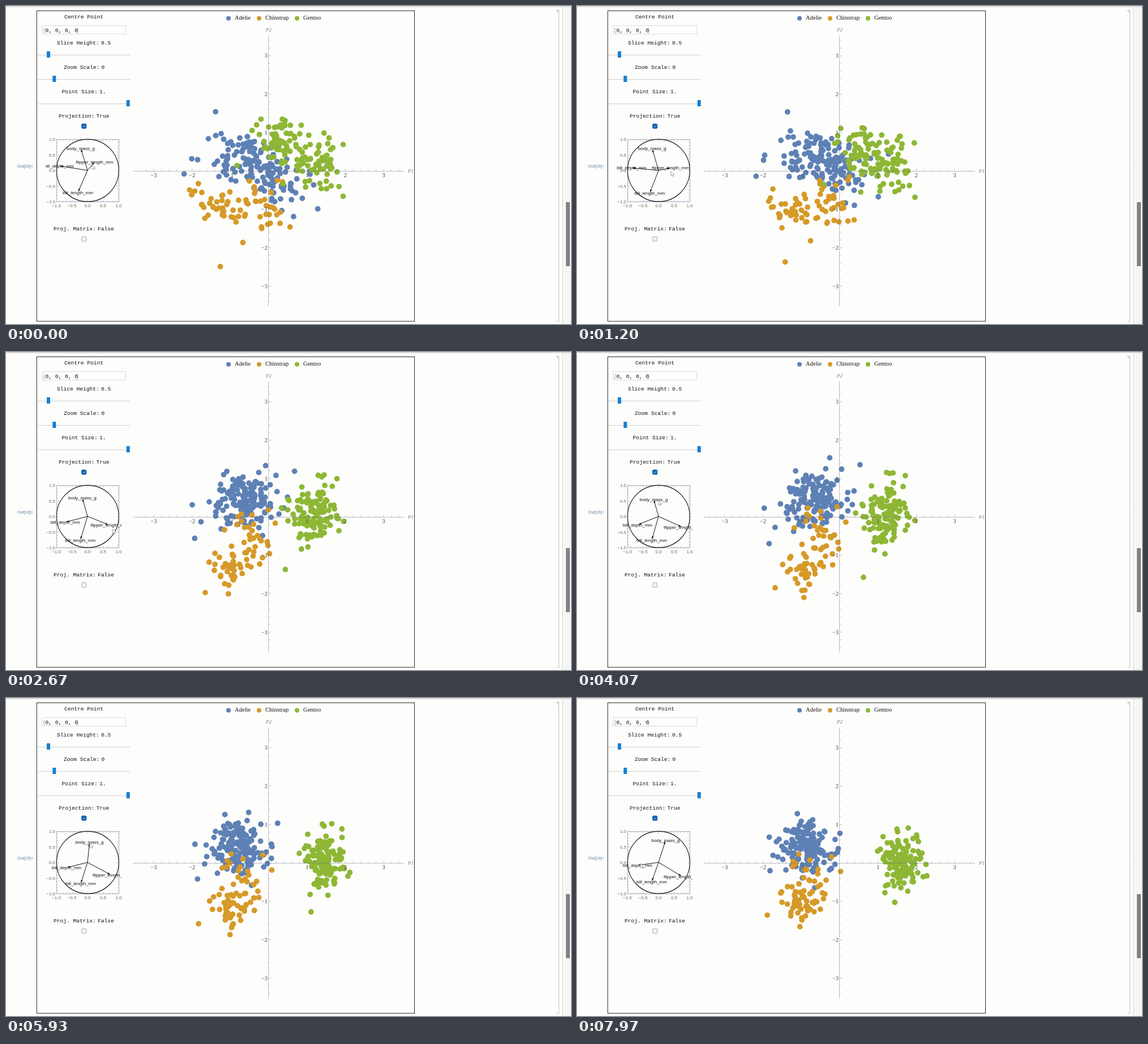
An HTML page with a canvas that plays this animation: 998 px wide and 561 px high, repeating every 8 s.

```html
<!DOCTYPE html>
<html lang="en">
<head>
<meta charset="utf-8">
<title>Projection tour</title>
<style>
html, body { margin: 0; width: 100%; height: 100%; overflow: hidden; background: #fdfdfc; }
canvas { display: block; width: 998px; height: 561px; }
</style>
</head>
<body>
<canvas id="stage"></canvas>
<script>
const W = 998, H = 561, LOOP = 8000;
const canvas = document.getElementById('stage');
const ctx = canvas.getContext('2d');
const dpr = window.devicePixelRatio || 1;
canvas.width = W * dpr;
canvas.height = H * dpr;
ctx.scale(dpr, dpr);

const MONO = '9.6px "Liberation Mono", "DejaVu Sans Mono", monospace';
const SANS = '"Liberation Sans", Arial, sans-serif';
const SERIF = '"Liberation Serif", "Times New Roman", serif';
const VARS = ['body_mass_g', 'flipper_length_mm', 'bill_depth_mm', 'bill_length_mm'];

// Label positions (x, y per variable) at the turning points of the two drags
const POSES = [
  [132, 251, 156.5, 275, 93.5, 282, 127, 329],
  [133.5, 252, 173, 296, 99, 289, 129.5, 332],
  [135.5, 260, 186, 309, 107, 305, 132, 332],
  [156.5, 251, 186, 315, 107, 295, 132, 324]
];
const easeIn = p => p ** 1.5;
const linear = p => p;
const TOUR = [
  { from: 0, to: 1870, a: POSES[0], b: POSES[1], ease: easeIn },
  { from: 1870, to: 3000, a: POSES[1], b: POSES[2], ease: linear },
  { from: 4650, to: 6900, a: POSES[2], b: POSES[3], ease: linear }
];
const CURSOR = [
  { from: 0, to: 1870, a: [155, 284], b: [182, 307], ease: easeIn },
  { from: 1870, to: 3000, a: [182, 307], b: [195, 320], ease: linear },
  { from: 3430, to: 4070, a: [195, 320], b: [147, 266], ease: linear },
  { from: 4270, to: 5370, a: [147, 266], b: [147, 261], ease: linear },
  { from: 5370, to: 6900, a: [147, 261], b: [158, 259], ease: linear },
  { from: 7330, to: 7970, a: [158, 259], b: [115, 296], ease: linear }
];

function sample(track, t) {
  const leg = track.filter(l => t >= l.from).pop();
  const p = leg.ease(Math.min(1, (t - leg.from) / (leg.to - leg.from)));
  return leg.a.map((v, i) => v + (leg.b[i] - v) * p);
}

// Standardised traits in VARS order: centre, half the gap between sexes, spread
const SPECIES = [
  { name: 'Adelie', color: '#5e81b5', count: 151, legend: 393,
    mean: [-0.62, -0.78, 0.61, -0.94], sex: [0.42, 0.16, 0.37, 0.29], sd: [0.38, 0.43, 0.48, 0.39],
    outliers: [[0.25, -0.2, 2, -1.7], [0, -0.49, 2.2, 0.38], [-1.44, -0.92, -0.84, -2.16]] },
  { name: 'Chinstrap', color: '#d69a28', count: 68, legend: 447,
    mean: [-0.58, -0.36, 0.64, 0.9], sex: [0.26, 0.29, 0.42, 0.41], sd: [0.4, 0.42, 0.39, 0.4],
    outliers: [[-0.63, -1.42, 0.33, 2.58]] },
  { name: 'Gentoo', color: '#8eb735', count: 123, legend: 514,
    mean: [1.09, 1.16, -1.1, 0.655], sex: [0.5, 0.31, 0.38, 0.36], sd: [0.37, 0.34, 0.32, 0.4],
    outliers: [[2.3, 2.07, -0.08, 2.87], [2.62, 1.43, -0.99, 0.97]] }
];

let seed = 77;
function random() {
  seed = (seed + 0x6d2b79f5) | 0;
  let t = Math.imul(seed ^ (seed >>> 15), 1 | seed);
  t = (t + Math.imul(t ^ (t >>> 7), 61 | t)) ^ t;
  return ((t ^ (t >>> 14)) >>> 0) / 4294967296;
}
function normal() {
  const n = Math.sqrt(-2 * Math.log(1 - random())) * Math.cos(2 * Math.PI * random());
  return Math.max(-2, Math.min(2, n));
}

// Two sexes per species; body size is shared by all four traits
function makePoints(s) {
  const points = [...s.outliers];
  while (points.length < s.count) {
    const sign = points.length % 2 ? 1 : -1;
    const size = normal();
    points.push(s.mean.map((m, i) =>
      m + sign * s.sex[i] + s.sd[i] * (0.5 * size + 0.866 * normal())));
  }
  return points;
}
SPECIES.forEach(s => { s.points = makePoints(s); });

function text(str, x, y, font, color = '#111', align = 'left') {
  ctx.font = font;
  ctx.fillStyle = color;
  ctx.textAlign = align;
  ctx.fillText(str, x, y);
}
function line(x1, y1, x2, y2, color, width = 1) {
  ctx.strokeStyle = color;
  ctx.lineWidth = width;
  ctx.beginPath();
  ctx.moveTo(x1, y1);
  ctx.lineTo(x2, y2);
  ctx.stroke();
}
function dot(x, y, r, color) {
  ctx.fillStyle = color;
  ctx.beginPath();
  ctx.arc(x, y, r, 0, 2 * Math.PI);
  ctx.fill();
}
function box(x, y, w, h, color, width = 1) {
  ctx.strokeStyle = color;
  ctx.lineWidth = width;
  ctx.strokeRect(x, y, w, h);
}
const minus = s => String(s).replace('-', '\u2212');

function drawWindow() {
  ctx.fillStyle = '#fdfdfc';
  ctx.fillRect(0, 0, W, H);
  line(0, 1, W, 1, '#cfcdc8', 1.5);
  ctx.fillStyle = '#f6f6f6';
  ctx.fillRect(986, 2, 12, H);
  line(983.5, 2, 983.5, H, '#cfcfcf');
  line(976.5, 7, 976.5, 556, '#c4c4c4');
  line(972, 556.5, 977, 556.5, '#c4c4c4');
  line(972, 7.5, 977, 7.5, '#b0b0b0');
  line(973, 8, 976, 12, '#b0b0b0');
  ctx.fillStyle = '#828282';
  ctx.fillRect(989, 346, 7, 113);
  box(54.3, 8.5, 667.2, 547.7, '#2a2a2a');
  text('Out[16]=', 48, 285, '7.3px ' + SANS, '#5f7ba3', 'right');
}

function slider(label, value, labelX, y, thumbX) {
  text(label, labelX, y - 18.5, MONO);
  text(value, labelX + 5.77 * label.length + 3, y - 18.5, MONO);
  line(56, y + 0.5, 219, y + 0.5, '#d0d0d2');
  ctx.fillStyle = '#1580d2';
  ctx.fillRect(thumbX, y - 6, 6, 11);
}
function checkbox(label, value, labelX, y, on) {
  text(label, labelX, y - 11.5, MONO);
  text(value, labelX + 5.77 * label.length + 3, y - 11.5, MONO);
  ctx.beginPath();
  ctx.roundRect(133.7, y, 8, 8, 1.5);
  ctx.fillStyle = on ? '#0f62b4' : '#f5f5f5';
  ctx.fill();
  ctx.strokeStyle = on ? '#0f5aa6' : '#a4a4a4';
  ctx.lineWidth = 1;
  ctx.stroke();
  if (!on) return;
  line(135.7, y + 4, 137.1, y + 5.5, '#cfe2f5', 0.9);
  line(137.1, y + 5.5, 140, y + 2.6, '#cfe2f5', 0.9);
}

function drawControls() {
  text('Centre Point', 103, 22, MONO);
  box(63.5, 34.5, 148, 15, '#dcdcdc');
  text('{', 64.5, 45.5, MONO, '#999');
  text('0, 0, 0, 0', 69.5, 45.5, MONO);
  text('}', 123.5, 45.5, MONO, '#999');
  slider('Slice Height:', '0.5', 90, 86, 72);
  slider('Zoom Scale:', '0', 102, 129, 82.3);
  slider('Point Size:', '1.', 98.5, 172, 212.7);
  checkbox('Projection:', 'True', 93, 208, true);
  checkbox('Proj. Matrix:', 'False', 84, 407, false);
}

function arrow(x, y) {
  const dx = x - 144, dy = y - 290, d = Math.hypot(dx, dy);
  const ux = dx / d, uy = dy / d;
  line(144, 290, x, y, '#111');
  ctx.fillStyle = '#111';
  ctx.beginPath();
  ctx.moveTo(x, y);
  ctx.lineTo(x - 4.5 * ux - 1.7 * uy, y - 4.5 * uy + 1.7 * ux);
  ctx.lineTo(x - 4.5 * ux + 1.7 * uy, y - 4.5 * uy - 1.7 * ux);
  ctx.fill();
}

function drawWheel(axes) {
  const frame = '#9a9db4';
  box(89.5, 235.5, 110, 110, frame, 0.8);
  for (let i = 0; i <= 20; i++) {
    const p = i * 5.5, n = i % 5 ? 1.8 : 3.2;
    line(89.5 + p, 345, 89.5 + p, 345 - n, frame, 0.7);
    line(89.5 + p, 236, 89.5 + p, 236 + n, frame, 0.7);
    line(90, 345.5 - p, 90 + n, 345.5 - p, frame, 0.7);
    line(199, 345.5 - p, 199 - n, 345.5 - p, frame, 0.7);
  }
  for (let v = -1; v <= 1; v += 0.5) {
    const s = minus(v.toFixed(1));
    text(s, 87, 293 - v * 55, '8px ' + SANS, '#666', 'right');
    text(s, 144 + v * 55, 354.5, '8px ' + SANS, '#666', 'center');
  }
  ctx.strokeStyle = '#111';
  ctx.lineWidth = 1.1;
  ctx.beginPath();
  ctx.arc(144.3, 290.1, 55, 0, 2 * Math.PI);
  ctx.stroke();
  ctx.save();
  ctx.beginPath();
  ctx.rect(70, 228, 134.5, 130);
  ctx.clip();
  VARS.forEach((name, i) => {
    const x = axes[2 * i], y = axes[2 * i + 1];
    arrow(144 + (x - 144) * 0.95, 290 + (y - 290) * 0.95);
    text(name, x, y + 2.6, '8px ' + SANS, '#111', 'center');
  });
  ctx.restore();
}

// The wheel's axes give the two unit rows of the projection
function projection(axes) {
  const row = (offset, origin, sign) => {
    const r = VARS.map((_, i) => sign * (axes[2 * i + offset] - origin));
    const len = Math.hypot(...r);
    return r.map(v => v / len);
  };
  return [row(0, 144, 1), row(1, 290, -1)];
}

const UNIT = 67.7, OX = 464, OY = 291;
function drawPoints(axes) {
  const [px, py] = projection(axes);
  const along = (p, v) => p.reduce((sum, c, i) => sum + c * v[i], 0);
  for (const s of SPECIES) {
    for (const v of s.points) dot(OX + UNIT * along(px, v), OY - UNIT * along(py, v), 4.9, s.color);
  }
}

function drawAxes() {
  const color = 'rgba(105,105,115,0.5)', font = '10.3px ' + SERIF;
  line(224, 291.5, 703, 291.5, color, 0.9);
  line(463.5, 52, 463.5, 530, color, 0.9);
  for (let i = -17; i <= 17; i++) {
    if (!i) continue;
    const major = i % 5 === 0, p = i / 5 * UNIT, n = major ? 4 : 2.5;
    line(OX + p, 291, OX + p, 291 - n, color, 0.8);
    line(464, OY - p, 464 + n, OY - p, color, 0.8);
    if (!major) continue;
    text(minus(i / 5), OX + p, 301.5, font, '#444', 'center');
    text(minus(i / 5), 462, OY - p + 3.5, font, '#444', 'right');
  }
  text('P1', 715, 294, 'italic 9px ' + SERIF, '#777', 'center');
  text('P2', 464, 45.3, 'italic 9px ' + SERIF, '#777', 'center');
}

function drawLegend() {
  for (const s of SPECIES) {
    dot(s.legend, 21.8, 4, s.color);
    text(s.name, s.legend + 11, 24.2, '10.6px ' + SERIF);
  }
}

function drawCursor([x, y]) {
  const shape = [[-3, -4], [-3, 4], [-1, 2.4], [0.6, 5], [1.9, 4.3], [0.5, 1.8], [3, 1.6]];
  ctx.beginPath();
  shape.forEach(([dx, dy]) => ctx.lineTo(x + dx, y + dy));
  ctx.closePath();
  ctx.fillStyle = '#fff';
  ctx.fill();
  ctx.strokeStyle = '#8c8c8c';
  ctx.lineWidth = 0.8;
  ctx.stroke();
}

function render(now) {
  const t = now % LOOP;
  const axes = sample(TOUR, t);
  drawWindow();
  drawControls();
  drawWheel(axes);
  drawPoints(axes);
  drawAxes();
  drawLegend();
  drawCursor(sample(CURSOR, t));
}

let start = null;
function tick(now) {
  if (start === null) start = now;
  render(Math.max(0, now - start));
  requestAnimationFrame(tick);
}
render(0);
requestAnimationFrame(tick);
</script>
</body>
</html>
```
